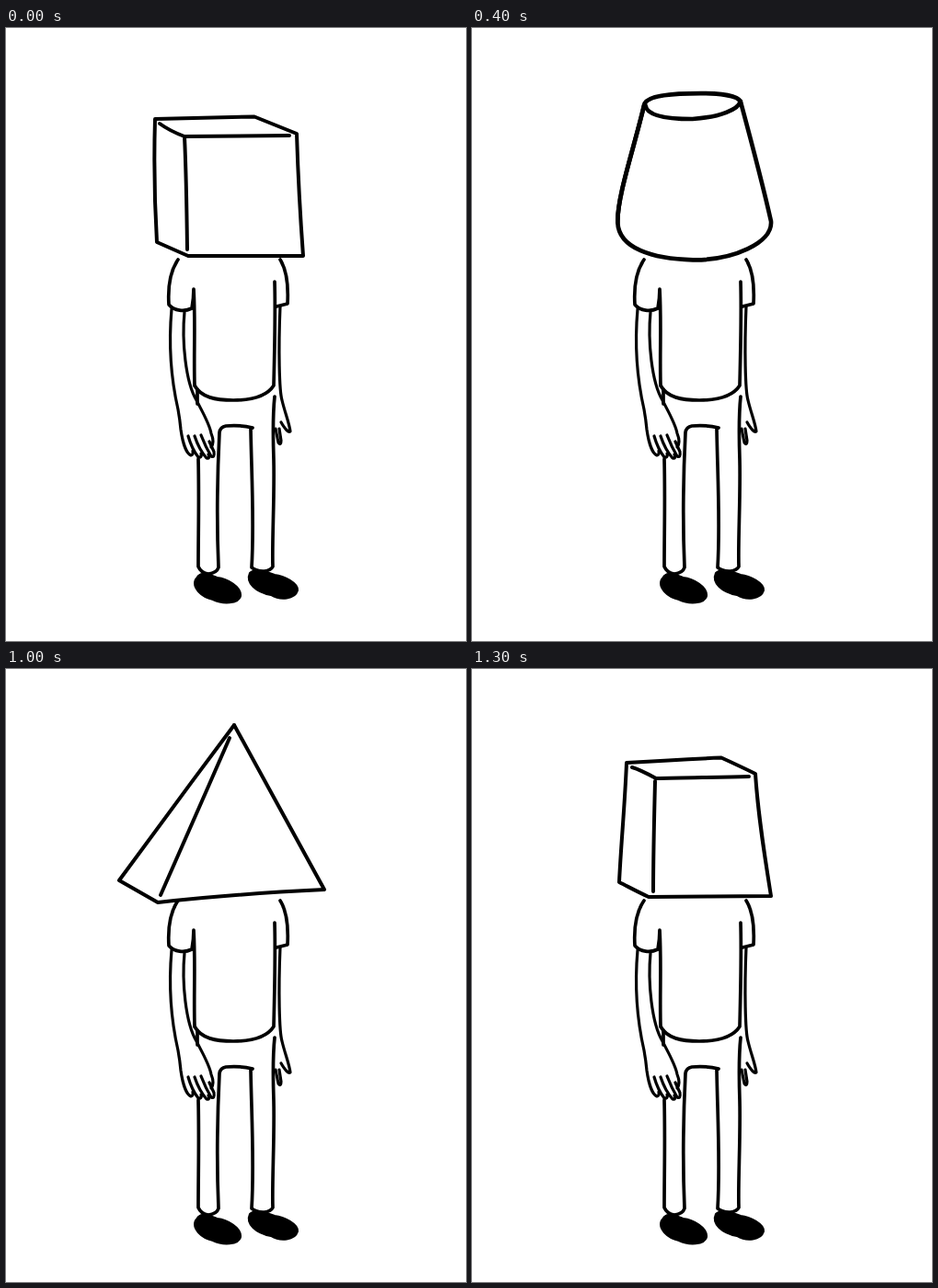
An HTML page for the animation above (1400 ms loop, 500 by 667 pixels).

```html
<!DOCTYPE html>
<html lang="en">
<head>
<meta charset="utf-8">
<title>Shape head</title>
<style>
html, body { margin: 0; width: 100%; height: 100%; overflow: hidden; background: #fff; }
svg { display: block; width: 100%; height: 100%; fill: none; stroke: #000; stroke-linecap: round; stroke-linejoin: round; }
</style>
</head>
<body>
<svg viewBox="0 0 500 667">
  <g id="shirt" stroke-width="3.7">
    <path d="M187 252C178 265 176 285 177 301C183 308 194 309 202 305Q204 294 204 284C206 320 204 355 205 389"/>
    <path d="M205 389C212 402 228 405 247 405C268 405 284 400 291 389C292 350 293 310 292 276"/>
    <path d="M298 252C305 263 307 282 306 300L294 303"/>
  </g>
  <g id="arms" stroke-width="3.2">
    <path d="M180 306C177 340 179 380 187 415Q189 426 190 437C192 451 196 463 201 465Q204 464 203 460"/>
    <path d="M194 309C191 340 195 385 207 405C212 415 221 430 223 441Q227 451 223 456"/>
    <path d="M198 444Q202 458 209 467Q213 468 212 463M205 444Q210 459 218 468Q222 469 220 464M212 443Q217 456 223 466Q227 468 226 461L221 450"/>
    <path d="M298 303C296 350 297 395 300 405C303 418 308 430 309 439Q306 441 299 429M293 436L296 451Q299 455 299 449L297 436"/>
  </g>
  <g id="legs" stroke-width="3.7">
    <path d="M208 393V409M209 469C210 510 209 550 209 586Q212 593 220 594Q229 593 231 587C229 540 230 480 232 440Q233 434 239 433C250 432 260 433 268 435"/>
    <path d="M266 436C267 490 270 540 267 587Q274 592 281 591Q288 590 290 586C289 560 292 510 291 470C290 440 290 420 292 401"/>
  </g>
  <g id="shoes" fill="#000" stroke-width="2">
    <path d="M209 596C215 591 225 596 230 598C240 599 256 608 255 618C253 627 235 627 225 622C212 619 202 609 206 600Z"/>
    <path d="M265 593C270 588 282 591 292 595C302 596 318 604 317 612C314 622 298 623 288 617C272 614 260 604 265 593Z"/>
  </g>
  <g id="head"><path/><path/></g>
</svg>
<script>
const STEP = 100, STEPS = 14;

// Each shape: outer contour, then top rim and front-left edge, then line width.
const box = [
  'M162 99L270 96.5L316 115Q318 180 323 248L198 248L164 233Q160 165 162 99Z',
  'M167 104Q178 112 194 118L308 117M194 118Q196 160 197 241',
  '4'
];
const softBox = [
  'M156 115C157 92 178 92 235 88.5C285 89 314 92 317 115C319 150 322 200 322 235C322 250 308 245 250 248C190 248 163 240 161 205C158 180 156 145 156 115Z',
  'M175 102C160 109 167 120 215 121C280 121 305 120 305 110M195 232C192 200 191 165 191 129',
  '4.5'
];
const cylinder = [
  'M161 104C162 90 195 85 235 84.5C280 83 318 87 319 100C321 140 323 180 323 212C322 240 280 252 240 251C200 250 164 240 164 212C161 180 162 140 161 104Z',
  'M163 103C165 121 200 126 240 126C285 123 316 110 318 97M164 212C161 180 162 140 161 104',
  '4.9'
];
const tip = (x, y) => `M${x} ${y}` + `C${x} ${y} ${x} ${y} ${x} ${y}`.repeat(2);
const cone = [
  tip(239, 45) + 'C270 95 302 150 329 207C337 222 290 255 240 255C190 254 150 240 147 210C151 190 205 110 239 45Z',
  tip(239, 45) + 'M147 210C151 190 205 110 239 45',
  '4.2'
];
const creasedCone = [
  tip(247, 55) + 'C273 92 305 155 329 205C343 241 280 249 235 249C185 248 143 240 139 215C138 200 215 105 247 55Z',
  tip(247, 55) + 'M181 212C197 178 214 140 229 99',
  '4.2'
];
const pyramid = [
  tip(248, 61) + 'C280 120 314 181 346 240C285 243 225 247 165 254C151 246 137 238 123 230C164 174 206 117 248 61Z',
  tip(248, 61) + 'M168 246C193 190 218 132 243 75',
  '4'
];
const frustum = [
  'M211 100C225 98 239 95 253 93C261 96 269 100 277 103C293 148 312 190 335 238C282 241 230 242 175 249C163 243 150 237 138 230C165 188 187 143 211 100Z',
  'M213 101C218 103 224 107 229 107C245 106 261 105 276 103M177 242C193 200 208 158 225 111',
  '4'
];
const slantBox = [
  'M168 102C200 100 236 98 271 96.5C283 102 296 108 308 114C311 160 318 203 325 247C281 247 236 248 192 248C181 243 170 237 160 232C162 190 166 150 168 102Z',
  'M174 107C181 109 189 113 200 119C230 118 265 118 301 117M197 242C197 202 198 162 199 122',
  '4'
];

const linear = t => t, easeOut = t => t * (2 - t);
const morphs = [
  [1, 3, softBox, cylinder, linear],
  [3, 6, cylinder, cone, linear],
  [6, 8, cone, creasedCone, linear],
  [8, 10, creasedCone, pyramid, linear],
  [10, 11, pyramid, frustum, linear],
  [11, 13, frustum, slantBox, easeOut]
];

function mix(a, b, t) {
  const ends = b.match(/[\d.]+/g);
  let i = 0;
  return a.replace(/[\d.]+/g, n => +n + (ends[i++] - n) * t);
}

function headAt(step) {
  if (step === 0) return box;
  const [start, end, a, b, ease] = morphs.find(m => step <= m[1]);
  const t = ease((step - start) / (end - start));
  return a.map((part, i) => mix(part, b[i], t));
}

const head = document.getElementById('head');

function draw(now) {
  const [outline, inner, width] = headAt(Math.floor(now / STEP) % STEPS);
  head.setAttribute('stroke-width', width);
  head.children[0].setAttribute('d', outline);
  head.children[1].setAttribute('d', inner);
  requestAnimationFrame(draw);
}
draw(performance.now());
</script>
</body>
</html>
```
